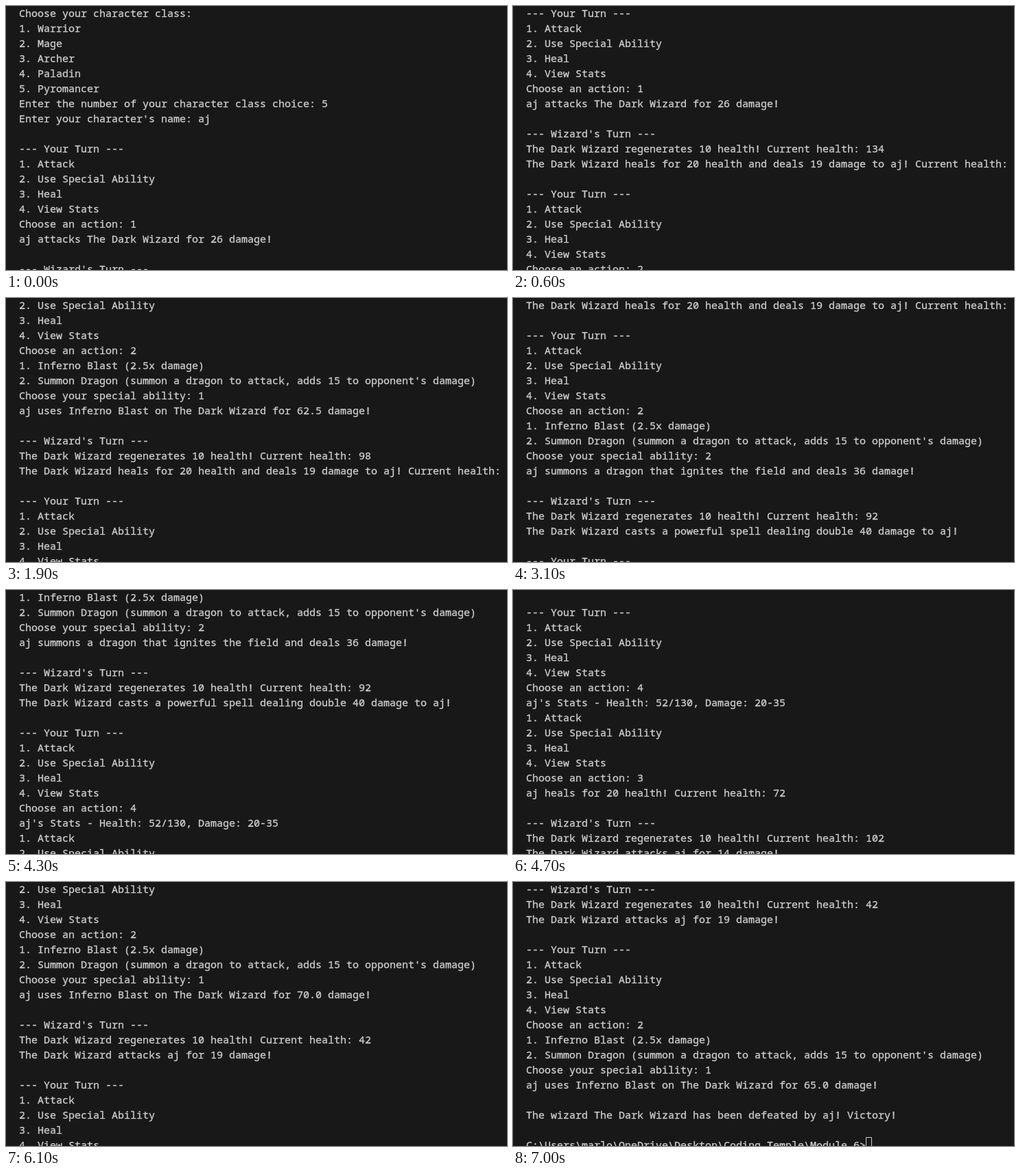
Write an HTML page with a canvas that moves like this. It is 730 px wide and 386 px high and loops after 8.5 s.

```html
<!DOCTYPE html>
<html lang="en">
<head>
<meta charset="utf-8">
<title>Terminal battle</title>
<style>
  html, body { margin: 0; width: 100%; height: 100%; overflow: hidden; background: #181818; }
  canvas { display: block; }
</style>
</head>
<body>
<canvas id="stage" width="730" height="386"></canvas>
<script>
const ctx = document.getElementById('stage').getContext('2d');
const LOOP = 8500, TICK = 100;
const LEFT = 19, BASELINE = 16, ROW = 22, CELL = 9, ROWS = 18;
const WIZARD = 'The Dark Wizard';
const PROMPT = 'C:\\Users\\marlo\\OneDrive\\Desktop\\Coding Temple\\Module 6>';

const menu = choice => [
  '1. Attack', '2. Use Special Ability', '3. Heal', '4. View Stats',
  `Choose an action: ${choice}`
];
const yourTurn = choice => ['', '--- Your Turn ---', ...menu(choice)];
const special = (choice, result) => [
  '1. Inferno Blast (2.5x damage)',
  "2. Summon Dragon (summon a dragon to attack, adds 15 to opponent's damage)",
  `Choose your special ability: ${choice}`,
  result
];
const inferno = damage => special(1, `aj uses Inferno Blast on ${WIZARD} for ${damage} damage!`);
const wizardTurn = (health, action) => [
  '', "--- Wizard's Turn ---",
  `${WIZARD} regenerates 10 health! Current health: ${health}`,
  `${WIZARD} ${action}`
];
const drain = 'heals for 20 health and deals 19 damage to aj! Current health:';

const lines = [
  'Choose your character class:',
  '1. Warrior', '2. Mage', '3. Archer', '4. Paladin', '5. Pyromancer',
  'Enter the number of your character class choice: 5',
  "Enter your character's name: aj",
  ...yourTurn(1), `aj attacks ${WIZARD} for 26 damage!`,
  ...wizardTurn(134, drain),
  ...yourTurn(2), ...inferno('62.5'),
  ...wizardTurn(98, drain),
  ...yourTurn(2), ...special(2, 'aj summons a dragon that ignites the field and deals 36 damage!'),
  ...wizardTurn(92, 'casts a powerful spell dealing double 40 damage to aj!'),
  ...yourTurn(4), "aj's Stats - Health: 52/130, Damage: 20-35",
  ...menu(3), 'aj heals for 20 health! Current health: 72',
  ...wizardTurn(102, 'attacks aj for 14 damage!'),
  ...yourTurn(2), ...inferno('70.0'),
  ...wizardTurn(42, 'attacks aj for 19 damage!'),
  ...yourTurn(2), ...inferno('65.0'),
  '', `The wizard ${WIZARD} has been defeated by aj! Victory!`,
  '', PROMPT
];

// [time in ms, first visible line]
const scroll = [
  [0, 0], [1100, 17], [1900, 23], [3100, 34], [3500, 41], [4200, 41],
  [4300, 42], [4800, 52], [5000, 52], [5300, 58], [5400, 58], [5500, 59],
  [6200, 73], [6600, 73], [6900, 79], [7000, 80], [LOOP, 80]
];

function firstLine(time) {
  const t = Math.floor(time / TICK) * TICK;
  const i = scroll.findIndex(([end]) => t < end);
  const [t0, a] = scroll[i - 1], [t1, b] = scroll[i];
  return Math.round(a + (b - a) * (t - t0) / (t1 - t0));
}

// A hairline outline gives the text its slightly heavier weight.
function drawText(text, x, y) {
  ctx.lineWidth = 0.35;
  ctx.strokeText(text, x, y);
  ctx.fillText(text, x, y);
}

function drawCursor(x, y) {
  ctx.lineWidth = 1;
  ctx.strokeRect(x + 0.5, y - 0.5, CELL - 1, ROW - 1);
}

function draw() {
  const top = firstLine(performance.now() % LOOP);
  ctx.fillStyle = '#181818';
  ctx.fillRect(0, 0, 730, 386);
  ctx.fillStyle = ctx.strokeStyle = '#cccccc';
  ctx.lineJoin = 'round';
  ctx.font = '15px "Noto Sans Mono", monospace';
  lines.slice(top, top + ROWS).forEach((line, row) => {
    drawText(line, LEFT, BASELINE + row * ROW);
    if (line === PROMPT) drawCursor(LEFT + line.length * CELL, row * ROW);
  });
  requestAnimationFrame(draw);
}
draw();
</script>
</body>
</html>
```
